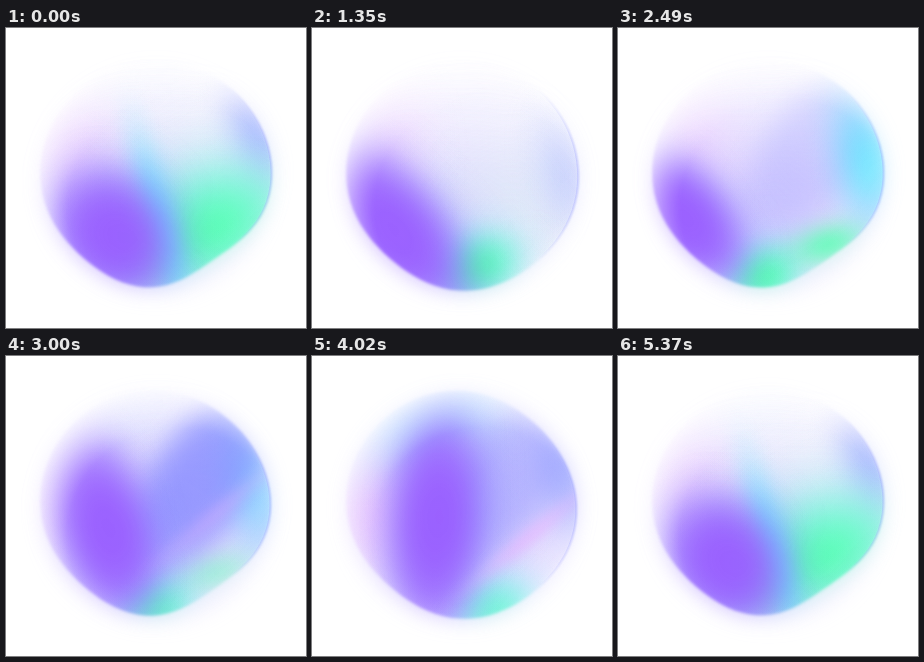
Write an HTML page with a canvas that moves like this. It is 300 px wide and 300 px high and loops after 5400 ms.

```html
<!DOCTYPE html>
<html lang="en">
<head>
<meta charset="utf-8">
<title>Orb</title>
<style>
  html, body { margin: 0; width: 100%; height: 100%; overflow: hidden; background: #fff; }
  canvas { display: block; width: 300px; height: 300px; }
</style>
</head>
<body>
<canvas id="stage" width="300" height="300"></canvas>
<script>
const LOOP = 5400, STEP = 30, MID = 150, RADIUS = 117, TAU = 2 * Math.PI;
const VIOLET = "153,92,255", BLUE = "118,125,255", LAVENDER = "200,188,255",
  PERIWINKLE = "168,178,255", PINK = "238,178,255", CYAN = "110,240,255",
  GREEN = "90,255,180", MINT = "150,255,205";

const ctx = document.getElementById("stage").getContext("2d");
const inkCanvas = document.createElement("canvas");
inkCanvas.width = inkCanvas.height = 300;
const ink = inkCanvas.getContext("2d");

const mix = (a, b, u) => a + (b - a) * u;
const rad = degrees => degrees * TAU / 360;

function smoothstep(from, to, v) {
  const u = Math.max(0, Math.min(1, (v - from) / (to - from)));
  return u * u * (3 - 2 * u);
}

// Periodic bump: 1 at the peak, narrower with a higher power.
const bump = (angle, peak, power) => ((1 + Math.cos(angle - peak)) / 2) ** power;

// Soft ellipse; rx and ry are where it has faded to half.
function lobe(rgb, alpha, x, y, rx, ry, turn = 0, firm = 2) {
  const reach = 2.5, stops = 16;
  const g = ink.createRadialGradient(0, 0, 0, 0, 0, reach);
  for (let i = 0; i <= stops; i++) {
    const r = i / stops;
    const a = alpha * 2 ** -((r * reach) ** firm) * (1 - r ** 8);
    g.addColorStop(r, `rgba(${rgb},${a.toFixed(4)})`);
  }
  ink.save();
  ink.translate(x, y);
  ink.rotate(rad(turn));
  ink.scale(rx, ry);
  ink.fillStyle = g;
  ink.fillRect(-reach, -reach, 2 * reach, 2 * reach);
  ink.restore();
}

// A circle pressed in at the lower left, lower right and upper right.
function orbPath(phase, rise) {
  const path = new Path2D();
  const dent = 11 + 6 * Math.cos(2 * phase);
  for (let deg = 0; deg < 360; deg += 4) {
    const a = rad(deg);
    const r = RADIUS - 9 * bump(a, rad(130), 10)
      - dent * bump(a, rad(55), 12) - 7 * rise * bump(a, rad(315), 8);
    path.lineTo(MID + r * Math.cos(a), MID + r * Math.sin(a));
  }
  path.closePath();
  return path;
}

function paintInk(phase, rise) {
  const c = Math.cos(phase), s = Math.sin(phase);
  const near = (part, power) => bump(phase, part * TAU, power);

  // Pale body
  lobe(LAVENDER, .45 - .12 * c - .15 * s, MID, 175 - 25 * rise, 85, 75);
  lobe(PINK, .3 + .15 * rise, 60, 125 + 30 * rise, 40, 55);
  lobe(CYAN, .45 * rise * near(.85, 2), 115, 60, 60, 35, -20);
  lobe(PERIWINKLE, .55 + .2 * c - .2 * s, 254, 135 - 30 * c + 15 * s, 24, 45, -15);
  lobe(MINT, .6 * near(.1, 8), 190, 195, 55, 65, 30);

  // Green swings along the bottom inside a cyan rim
  const open = near(0, 4);
  const gx = 174 + 28 * c - 8 * s, gy = 250 - 48 * open - 8 * s;
  const gw = 24 + 30 * open, gh = 20 + 16 * open;
  lobe(CYAN, .55, gx, gy, gw * 1.35, gh * 1.35, -25);
  lobe(GREEN, .95 - .5 * rise, gx, gy, gw, gh, -25);
  lobe(GREEN, .75 * near(.46, 8), 210, 216, 30, 16, -15);
  lobe(CYAN, .85 * near(.03, 6), 155 - 25 * s, 195 + 25 * s, 62, 14, 75 + 18 * s);
  lobe(CYAN, .8 * near(.47, 8), 246, 130, 48, 24, 80);

  // Violet rests at the lower left, then rises through the middle
  const vx = mix(87 + 20 * c - 5 * s, 124, rise);
  const vy = mix(200 + 10 * c + 5 * s, 165, rise);
  const vw = mix(55 + 24 * s, 88, rise);
  const vh = mix(42 + 6 * c, 38, rise);
  const turn = mix(50, 93, rise);
  lobe(BLUE, .8 * near(.62, 6), 195, 125, 92, 46, 125, 4);
  lobe(BLUE, .4, vx, vy, vw * 1.25, vh * 1.3, turn, 3);
  lobe(VIOLET, .92, vx, vy, vw, vh, turn, 3);
  lobe(PINK, .4 * rise, 215, 184 + 32 * c, 55, 8, -40);
}

function paintRim(orb) {
  const g = ink.createLinearGradient(225, 0, 266, 0);
  g.addColorStop(0, `rgba(${BLUE},0)`);
  g.addColorStop(1, `rgba(${BLUE},.35)`);
  ink.strokeStyle = g;
  ink.lineWidth = 3;
  ink.stroke(orb);
}

// Crisp below and to the right, dissolving at the upper left.
function trim(orb) {
  const g = ink.createRadialGradient(170, 180, 108, 170, 180, 162);
  g.addColorStop(0, "rgba(0,0,0,1)");
  g.addColorStop(1, "rgba(0,0,0,0)");
  ink.save();
  ink.globalCompositeOperation = "destination-in";
  ink.filter = "blur(1.5px)";
  ink.fillStyle = g;
  ink.fill(orb);
  ink.restore();
}

function paintHalo(rise) {
  const g = ctx.createLinearGradient(0, 36, 0, 264);
  g.addColorStop(0, `rgba(${LAVENDER},${.03 + .15 * rise})`);
  g.addColorStop(1, `rgba(${LAVENDER},.2)`);
  ctx.save();
  ctx.filter = "blur(10px)";
  ctx.fillStyle = g;
  ctx.beginPath();
  ctx.arc(MID, MID + 2, RADIUS - 2, 0, TAU);
  ctx.fill();
  ctx.globalAlpha = .4;
  ctx.drawImage(inkCanvas, 0, 0);
  ctx.restore();
}

function draw(t) {
  const phase = t / LOOP * TAU;
  const rise = smoothstep(.45, .85, (1 - Math.sin(phase)) / 2);
  const orb = orbPath(phase, rise);

  ink.clearRect(0, 0, 300, 300);
  paintInk(phase, rise);
  paintRim(orb);
  trim(orb);

  ctx.fillStyle = "#fff";
  ctx.fillRect(0, 0, 300, 300);
  paintHalo(rise);
  ctx.drawImage(inkCanvas, 0, 0);
}

const start = performance.now();
function tick() {
  const t = (performance.now() - start) % LOOP;
  draw(Math.floor(t / STEP) * STEP);
  requestAnimationFrame(tick);
}
tick();
</script>
</body>
</html>
```
